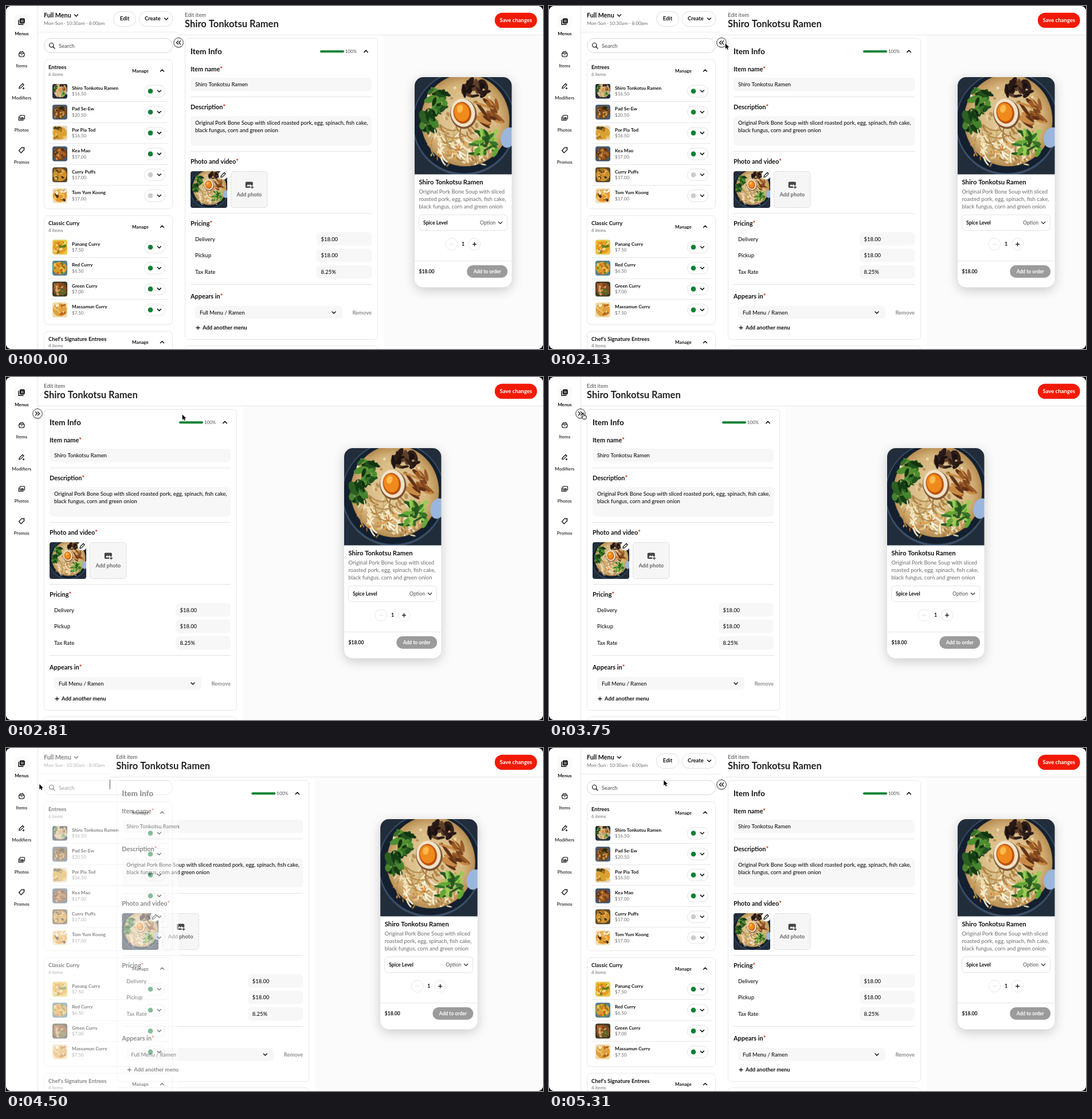
An HTML page with a canvas that plays this animation: 937x598 px, repeating every 5.38 s.

```html
<!DOCTYPE html>
<html lang="en">
<head>
<meta charset="utf-8">
<title>Menu editor</title>
<style>
  html, body { margin: 0; width: 100%; height: 100%; overflow: hidden; background: #000; }
  canvas { display: block; }
</style>
</head>
<body>
<canvas id="stage" width="937" height="598"></canvas>
<script>
const W = 937, H = 598, LOOP = 5380;
const INK = '#111', GRAY = '#6c6c6c', LINE = '#e7e7e7', GREEN = '#0a8233', RED = '#f21a05';
const stage = document.getElementById('stage').getContext('2d');
let c = stage;

// Runs a drawing routine on a separate canvas and returns that canvas.
function layer(w, h, draw) {
  const cv = document.createElement('canvas');
  cv.width = w; cv.height = h;
  const previous = c;
  c = cv.getContext('2d');
  draw();
  c = previous;
  return cv;
}

function text(str, x, y, size, weight = 400, color = INK, align = 'left') {
  c.font = `${weight} ${size}px Lato, "Open Sans", sans-serif`;
  c.fillStyle = color;
  c.textAlign = align;
  c.fillText(str, x, y + size * 0.33);
  return c.measureText(str).width;
}

function box(x, y, w, h, r, fill, stroke, width = 1) {
  c.beginPath();
  c.roundRect(x, y, w, h, r);
  if (fill) { c.fillStyle = fill; c.fill(); }
  if (stroke) { c.strokeStyle = stroke; c.lineWidth = width; c.stroke(); }
}

function oval(x, y, rx, ry, fill, angle = 0) {
  c.beginPath();
  c.ellipse(x, y, rx, ry, angle, 0, Math.PI * 2);
  c.fillStyle = fill;
  c.fill();
}

function poly(points, color, width = 1.3, fill) {
  c.beginPath();
  for (let i = 0; i < points.length; i += 2) c.lineTo(points[i], points[i + 1]);
  c.lineCap = c.lineJoin = 'round';
  if (fill) { c.closePath(); c.fillStyle = fill; c.fill(); }
  if (color) { c.strokeStyle = color; c.lineWidth = width; c.stroke(); }
}

const rule = (x1, x2, y, color = LINE) => { c.fillStyle = color; c.fillRect(x1, y, x2 - x1, 1); };
const chevron = (x, y, dir, s = 3, width = 1.5) =>
  poly([x - s, y - dir * s / 2, x, y + dir * s / 2, x + s, y - dir * s / 2], INK, width);
const plus = (x, y, s, color = INK) => {
  poly([x - s, y, x + s, y], color);
  poly([x, y - s, x, y + s], color);
};

function random(seed) {
  return () => (seed = (seed * 16807) % 2147483647) / 2147483647;
}

const ramen = layer(169, 169, () => {
  const rnd = random(77);
  const scatter = (n, x, y, sx, sy, rx, ry, colors, angle = 0, spread = 3) => {
    for (let i = 0; i < n; i++)
      oval(x + (rnd() - 0.5) * sx, y + (rnd() - 0.5) * sy, rx * (0.5 + rnd()), ry * (0.5 + rnd()),
        colors[i % colors.length], angle + (rnd() - 0.5) * spread);
  };
  const strands = (n, x, y, sx, sy, angle, width, colors) => {
    for (let i = 0; i < n; i++) {
      const px = x + (rnd() - 0.5) * sx, py = y + (rnd() - 0.5) * sy;
      const a = angle + (rnd() - 0.5) * 1.8, r = 9 + rnd() * 14;
      c.beginPath();
      c.moveTo(px, py);
      c.quadraticCurveTo(px + r * Math.cos(a + 0.5), py + r * Math.sin(a + 0.5),
        px + 1.6 * r * Math.cos(a), py + 1.6 * r * Math.sin(a));
      c.strokeStyle = colors[i % colors.length];
      c.lineWidth = width;
      c.lineCap = 'round';
      c.stroke();
    }
  };
  c.fillStyle = '#222d3b'; c.fillRect(0, 0, 169, 169);
  oval(86, 80, 90, 91, '#3b5068');
  oval(86, 79, 88, 88, '#14202f');
  const broth = c.createRadialGradient(85, 70, 15, 87, 76, 82);
  broth.addColorStop(0, '#e2cb9b');
  broth.addColorStop(0.7, '#d3b27a');
  broth.addColorStop(1, '#b0854a');
  oval(88, 75, 77, 80, broth);
  scatter(90, 86, 80, 125, 130, 4, 2, ['#ecdcb4', '#b88f56', '#dfc187', '#c79d5c']);
  scatter(26, 38, 44, 38, 40, 9, 4, ['#1f4f1c', '#4f8f2f', '#12330f', '#37702a']);
  scatter(22, 24, 76, 22, 32, 8, 4, ['#143c14', '#47842e', '#0f2a12', '#2c5f22']);
  scatter(22, 104, 22, 38, 28, 9, 4, ['#33201a', '#1b1212', '#60402b', '#281916']);
  scatter(22, 131, 60, 34, 44, 13, 3.5, ['#9a5a26', '#5f3016', '#c98a45', '#7d4520'], 0.8, 1.2);
  strands(40, 78, 104, 70, 40, 1.3, 2.6, ['#f3e8c8', '#cfae6c', '#fbf4de', '#a97c40']);
  strands(14, 45, 100, 30, 36, 0.8, 2.2, ['#efe0b6', '#b58a4c']);
  scatter(36, 124, 114, 40, 40, 8, 2.6, ['#63a833', '#35752a', '#9acb55', '#25571f']);
  scatter(14, 60, 128, 64, 30, 3.5, 1.5, ['#d9772a', '#e9a44c']);
  scatter(10, 86, 146, 70, 14, 4, 1.5, ['#f0dfb4', '#a67a3f']);
  oval(85, 64, 23, 26, '#7c5230', -0.2);
  oval(84, 62, 21, 24.5, '#f1e3cb', -0.2);
  oval(83, 62, 15.5, 19, '#bb520c', -0.2);
  oval(82, 61, 13, 16, '#f08a1c', -0.2);
  oval(79, 55, 5, 7, '#fbbb4c', 0.3);
  oval(163, 105, 13, 18, '#9bb6dc', 0.25);
});

function dish(x, y, seed, [back, ...tones]) {
  const rnd = random(seed * 991 + 7);
  c.save();
  box(x, y, 26, 26, 4, back);
  c.clip();
  oval(x + 13, y + 13, 12, 11, tones[0]);
  for (let i = 0; i < 26; i++)
    oval(x + 4 + rnd() * 18, y + 4 + rnd() * 18, 1 + rnd() * 3, 1 + rnd() * 2, tones[i % tones.length], rnd() * 3);
  c.restore();
}

function photo(x, y, size, r) {
  c.save();
  box(x, y, size, size, r);
  c.clip();
  c.imageSmoothingQuality = 'high';
  c.drawImage(ramen, x, y, size, size);
  c.restore();
}

const entrees = [
  ['Shiro Tonkotsu Ramen', '$16.50'],
  ['Pad Se-Ew', '$20.50', ['#4a5c70', '#75481b', '#b0702d', '#30280f', '#d19a4a']],
  ['Por Pia Tod', '$16.50', ['#e6d8c0', '#d9a032', '#b4751c', '#e8bf58', '#55481e']],
  ['Kea Mao', '$17.00', ['#44566b', '#7b4519', '#a8612a', '#382412', '#c98a42']],
  ['Curry Puffs', '$17.00', ['#5a4a2c', '#d0902f', '#e8b24c', '#a86a1e', '#3a3418']],
  ['Tom Yum Koong', '$17.00', ['#f0dfba', '#e3962d', '#f2c25a', '#4a3012', '#f8ead0']],
];
const curries = [
  ['Panang Curry', '$7.50', ['#e8c64a', '#e5a022', '#f4dc90', '#5d7f26', '#d97a1c']],
  ['Red Curry', '$6.50', ['#55808a', '#dc9a2b', '#ebc550', '#47802f', '#c9671f']],
  ['Green Curry', '$7.00', ['#3c3a22', '#84491f', '#d3a266', '#4d7028', '#a9602c']],
  ['Massamun Curry', '$7.50', ['#efd9a8', '#dfa03e', '#b9681f', '#fbedcc', '#e9bc5c']],
];

function group(y, height, title, count, items, seed) {
  box(66.5, y + 0.5, 224, height, 7, '#fff', LINE);
  text(title, 74, y + 14, 9.4, 700);
  text(`${count} items`, 74, y + 26, 7.9, 400, GRAY);
  text('Manage', 220, y + 20, 8.1, 700);
  chevron(272.5, y + 19.5, -1);
  items.forEach(([name, price, tones], i) => {
    const cy = y + 55.5 + i * 36.45;
    if (i) rule(74, 283, Math.round(cy - 18.5));
    if (tones) dish(81, cy - 13, seed + i, tones);
    else photo(81, cy - 13, 26, 4);
    text(name, 115, cy - 5.5, 8.2, 700);
    text(price, 115, cy + 5.2, 8, 400, GRAY);
    box(241.5, cy - 10.2, 36, 20.5, 10.2, '#fff', '#e2e2e2');
    oval(252, cy, 4.3, 4.3, count === 6 && i > 3 ? '#cbcbcb' : GREEN);
    chevron(267.3, cy, 1);
  });
}

const listPanel = layer(W, H, () => {
  c.fillStyle = '#fff';
  c.fillRect(56, 0, 245, H);
  text('Full Menu', 66, 16, 10.8, 700);
  chevron(122.5, 16.5, 1);
  text('Mon-Sun · 10:30am - 8:00pm', 66, 30, 8.2, 400, GRAY);
  box(187.5, 9.5, 39, 26, 13, '#fff', '#dedede');
  text('Edit', 207, 22.3, 9.4, 700, INK, 'center');
  box(232, 9.5, 59, 26, 13, '#fff', '#dedede');
  text('Create', 242, 22.3, 9.4, 700);
  chevron(279.5, 22.5, 1);
  rule(56, 301, 45, '#ececec');
  box(66.5, 56.5, 224, 25, 12.5, '#fff', '#d6d6d6');
  c.beginPath(); c.arc(79.3, 68.2, 3.7, 0, 7);
  c.strokeStyle = INK; c.lineWidth = 1.2; c.stroke();
  poly([82.2, 71.2, 85, 74], INK);
  text('Search', 92, 69.5, 9.4, 400, '#4c4c4c');
  group(93, 260, 'Entrees', 6, entrees, 1);
  group(365, 190, 'Classic Curry', 4, curries, 20);
  group(566.5, 60, 'Chef’s Signature Entrees', 4, [], 0);
});

function heading(str, y) {
  const w = text(str, 322, y, 10.9, 700);
  text('*', 322 + w, y, 10.9, 700, '#d4250e');
}

function pictureIcon(x, y) {
  box(x - 3, y - 4.5, 8.2, 6.6, 1.2, null, INK, 1.2);
  poly([x - 5, y - 2, x - 5, y + 4.2, x + 3, y + 4.2], INK, 1.2);
  poly([x - 1.8, y + 1, x - 0.3, y - 1.3, x + 0.8, y, x + 2, y - 1.5, x + 4, y + 1], null, 0, INK);
}

function addPictureIcon(x, y) {
  box(x - 6.5, y - 5.5, 13, 10.5, 1.8, '#444');
  poly([x - 4.5, y + 2.5, x - 2, y - 1.2, x, y + 1, x + 2, y - 1.5, x + 4.5, y + 2.5], null, 0, '#f6f6f6');
  oval(x + 5.2, y + 4, 3.6, 3.6, '#f6f6f6');
  plus(x + 5.2, y + 4, 2.1, '#444');
}

function pencil(x, y, s) {
  poly([x - s, y + s, x - s + 0.8, y + s * 0.3, x + s * 0.5, y - s, x + s, y - s * 0.5, x - s * 0.3, y + s - 0.8, x - s, y + s], INK, 1.2);
}

function editor() {
  c.fillStyle = '#fff';
  c.fillRect(301, 0, 358, H);
  box(312.5, 56.5, 336, 525, 6, '#fff', LINE);
  box(312.5, 592.5, 336, 30, 6, '#fff', LINE);
  text('Item Info', 322, 79.5, 13.6, 700);
  box(548, 77.3, 42, 4, 2, GREEN);
  text('100%', 592, 79.5, 7.9, 400, '#4c4c4c');
  chevron(628, 79, -1, 3.2);

  heading('Item name', 110.5);
  box(322, 125, 316, 23.5, 6, '#f7f7f7');
  text('Shiro Tonkotsu Ramen', 330, 137, 9.4, 500);
  heading('Description', 176.7);
  box(322, 192, 316, 51, 6, '#f7f7f7');
  text('Original Pork Bone Soup with sliced roasted pork, egg, spinach, fish cake,', 330, 203.5, 9.45, 500);
  text('black fungus, corn and green onion', 330, 216.5, 9.45, 500);

  heading('Photo and video', 271.7);
  photo(322, 288, 64, 4);
  box(371, 286.5, 16, 16, 8, '#fff');
  pencil(379, 294.5, 4.2);
  c.setLineDash([3, 2]);
  box(392.5, 288.5, 63.5, 63, 5, '#f6f6f6', '#d8d8d8');
  c.setLineDash([]);
  addPictureIcon(424.3, 312);
  text('Add photo', 424.3, 329, 9.3, 700, '#666', 'center');

  heading('Pricing', 379.7);
  [['Delivery', '$18.00'], ['Pickup', '$18.00'], ['Tax Rate', '8.25%']].forEach(([label, value], i) => {
    const y = 406 + i * 28.7;
    text(label, 330, y + 0.5, 9.45, 500);
    box(542, y - 11.7, 96, 23.4, 6, '#f7f7f7');
    text(value, 549.5, y + 0.5, 9.45, 500);
  });

  heading('Appears in', 506.2);
  box(330, 523, 257, 22.5, 6, '#f7f7f7');
  text('Full Menu / Ramen', 338, 534.5, 9.4, 500);
  chevron(572, 534.5, 1);
  text('Remove', 638, 534.5, 9.4, 700, '#8e8e8e', 'right');
  plus(335, 561, 3);
  text('Add another menu', 343, 561.3, 9.4, 700);
  [158, 253, 361, 485].forEach(y => rule(322, 638, y, '#e2e2e2'));
}

function preview() {
  c.save();
  c.shadowColor = 'rgba(0,0,0,.2)';
  c.shadowBlur = 20;
  c.shadowOffsetY = 5;
  box(713, 124, 169.5, 366.5, 15, '#fff');
  c.restore();
  photo(713, 124, 169.5, [15, 15, 0, 0]);
  text('Shiro Tonkotsu Ramen', 720.5, 307.5, 11.3, 700);
  ['Original Pork Bone Soup with sliced', 'roasted pork, egg, spinach, fish cake,', 'black fungus, corn and green onion']
    .forEach((line, i) => text(line, 720.5, 324 + i * 13, 9.55, 400, GRAY));
  box(720.5, 364, 154, 27.5, 6, '#fff', '#e3e3e3');
  text('Spice Level', 728, 378, 8.7, 700);
  text('Option', 827, 378, 8.8, 400, '#4c4c4c');
  chevron(862.5, 378, 1, 3.2, 1.2);
  [777.5, 817.5].forEach(x => box(x - 10.3, 405, 20.6, 20.6, 10.3, '#fff', '#e7e7e7'));
  poly([774.5, 415.3, 780.5, 415.3], '#dcdcdc', 1);
  text('1', 797.5, 415.5, 8.8, 700, INK, 'center');
  plus(817.5, 415.3, 3);
  rule(713, 882.5, 444);
  text('$18.00', 720.5, 463, 8.6, 700);
  box(804.3, 452, 70.8, 21.7, 10.8, '#9b9b9b');
  text('Add to order', 839.7, 463.2, 8.5, 700, '#fff', 'center');
}

function header() {
  c.fillStyle = '#fff';
  c.fillRect(301, 0, W, 50);
  rule(301, 301 + W, 50);
  text('Edit item', 312, 16, 9.45, 400, '#4c4c4c');
  text('Shiro Tonkotsu Ramen', 312, 32, 16.5, 700, '#222');
}

function toggle(flip) {
  c.save();
  c.translate(301, 63.7);
  c.scale(Math.abs(flip) < 0.03 ? 0.03 : flip, 1);
  oval(0, 1, 9.2, 9.2, 'rgba(0,0,0,.12)');
  box(-8.3, -8.3, 16.6, 16.6, 8.3, '#fff', '#3c3c3c');
  [-0.5, 3.5].forEach(x => poly([x, -3, x - 3, 0, x, 3], INK));
  c.restore();
}

function sidebar() {
  c.fillStyle = '#fff';
  c.fillRect(0, 0, 55, H);
  c.fillStyle = LINE;
  c.fillRect(55, 0, 1, H);
  box(15, 15, 25, 25, 6, '#fafafa');
  ['Menus', 'Items', 'Modifiers', 'Photos', 'Promos'].forEach((label, i) =>
    text(label, 27.3, 48.7 + i * 56, 8, 700, i ? '#3c3c3c' : INK, 'center'));
  box(24.3, 22, 8, 8, 1.2, INK, INK);
  poly([22, 24.5, 22, 32.3, 30, 32.3], INK, 1.4);
  poly([26, 25, 30.5, 25], '#fff', 1);
  poly([26, 27.5, 30.5, 27.5], '#fff', 1);
  box(22.7, 82.3, 9.2, 6.2, [0.5, 0.5, 3, 3], null, INK, 1.2);
  poly([23.7, 82, 25, 79.5, 27, 80.3, 29, 79, 31, 82], INK, 1.2);
  poly([26, 85, 28.8, 85], INK, 1.2);
  pencil(27, 139.5, 4.2);
  poly([29, 143.5, 32, 143.5], INK, 1.2);
  poly([30.5, 142, 30.5, 145], INK, 1.2);
  pictureIcon(27.3, 195);
  poly([22.5, 252, 27.5, 246.7, 31.8, 246.7, 31.8, 250.5, 26.3, 256, 22.5, 252], INK, 1.2);
  oval(29.8, 248.7, 0.8, 0.8, INK);
}

// Ease-out timing, cubic-bezier(0, 0, .58, 1).
function easeOut(x) {
  if (x <= 0) return 0;
  if (x >= 1) return 1;
  let lo = 0, hi = 1;
  for (let i = 0; i < 24; i++) {
    const s = (lo + hi) / 2;
    if (1.74 * (1 - s) * s * s + s ** 3 < x) lo = s; else hi = s;
  }
  return lo * lo * (3 - 2 * lo);
}

const collapse = t => easeOut((t - 2174) / 300) - easeOut((t - 4395) / 300);

const cursorPath = [
  [560, 430, 190], [1060, 313.5, 76.5], [1640, 313.5, 76.5], [1690, 307.7, 65.5], [3000, 307.7, 65.5],
  [3500, 67, 66], [3650, 60, 64], [4350, 60, 64], [4450, 58.3, 63], [4760, 58.3, 63], [5310, 200.3, 56.3], [5380, 214, 53],
];
const arrow = [0, 0, 0, 9.2, 2.1, 7.3, 3.6, 10.6, 5.2, 9.8, 3.7, 6.7, 6.6, 6.5];
const hand = [-1, -1, 0.8, -1, 1, 3, 5, 4, 5.3, 7, 4.2, 9.5, -0.5, 9.5, -3.5, 5.3, -2.7, 4.5, -1, 6, -1, -1];

function cursor(t) {
  const i = cursorPath.findIndex(k => k[0] > t);
  if (i < 1) return;
  const [t0, x0, y0] = cursorPath[i - 1], [t1, x1, y1] = cursorPath[i];
  const u = (t - t0) / (t1 - t0), e = u * u * (3 - 2 * u);
  c.save();
  c.translate(x0 + (x1 - x0) * e, y0 + (y1 - y0) * e);
  if (t > 3540 && t < 4420) {
    poly(hand, '#111', 1, '#fff');
  } else {
    poly(arrow, '#fff', 1.4);
    poly(arrow, null, 0, '#000');
  }
  c.restore();
}

function shifted(dx, draw) {
  c.save();
  c.translate(dx, 0);
  draw();
  c.restore();
}

function render(t) {
  const p = collapse(t), dx = -246 * p;
  c.fillStyle = '#000';
  c.fillRect(0, 0, W, H);
  c.save();
  box(0, 0, W, H, 9, '#fff');
  c.clip();
  c.fillStyle = '#fbfbfb';
  c.fillRect(659 + dx, 51, W, H);
  shifted(dx, editor);
  shifted(dx / 2, preview);
  c.globalAlpha = 1 - p;
  c.drawImage(listPanel, 0, 0);
  c.globalAlpha = 1;
  shifted(dx, header);
  box(852.8, 11.7, 73.8, 26.4, 13.2, RED);
  text('Save changes', 889.7, 25.3, 9.5, 700, '#fff', 'center');
  sidebar();
  shifted(dx, () => toggle(1 - 2 * p));
  cursor(t);
  c.restore();
}

const start = performance.now();
function tick() {
  render((performance.now() - start) % LOOP);
  requestAnimationFrame(tick);
}
tick();
</script>
</body>
</html>
```
